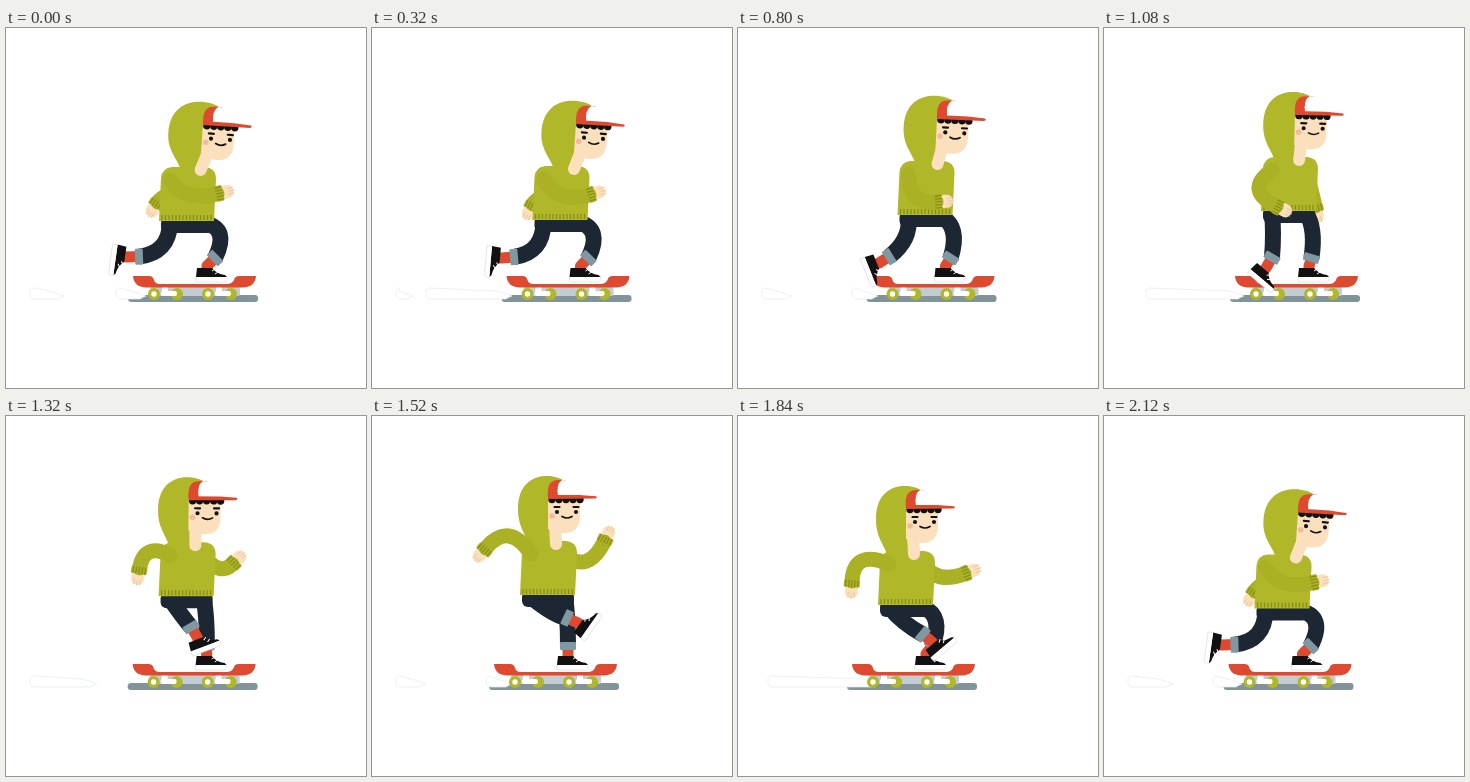
These frames come from a looping animation (360 by 360 pixels, 2160 ms). An HTML page with a canvas:

```html
<!DOCTYPE html>
<html lang="en">
<head>
<meta charset="utf-8">
<title>Skater</title>
<style>
  html, body { margin: 0; width: 100%; height: 100%; overflow: hidden; background: #fff; }
  canvas { display: block; width: 360px; height: 360px; }
</style>
</head>
<body>
<canvas id="stage" width="360" height="360"></canvas>
<script>
const g = document.getElementById('stage').getContext('2d');
const LOOP = 2160, STEP = 40, RAD = Math.PI / 180;
const GREEN = '#b0b729', DARK = '#858b16', SLEEVE = '#abb125', PANTS = '#1c2733', CUFF = '#7f98a2',
      RED = '#de4a30', SKIN = '#fbe0bd', BLACK = '#111', WHITE = '#fff';

// Key times, and the value of each moving part at those times
const KEYS = [0, 320, 800, 1080, 1520, 1840, 1970, 2120];
const TRACKS = {
  board:  [127, 134.5, 133.5, 131, 122, 114, 117, 124.5],
  hemY:   [193, 192, 187, 183, 179, 189, 193, 192.5],
  headX:  [197, 204, 199, 191, 176, 168, 179, 194],
  kneeX:  [224, 231, 222, 212, 196, 206, 212, 222],
  pushCX: [163, 171, 173, 170, 182, 165, 160, 161],
  pushCY: [225, 225, 212, 205, 200, 208, 222, 225],
  footX:  [121, 130, 141, 162, 206, 194, 160, 118.5],
  footY:  [229, 230, 235, 240, 207, 226, 240, 229],
  footA:  [98, 95, 68, 40, -55, -40, 20, 98],
  nearCX: [178, 186, 170, 140, 137, 116, 133, 175],
  nearCY: [174, 176, 176, 162, 105, 133, 170, 174],
  nearWX: [211, 217, 198, 172, 114, 114, 152, 208],
  nearWY: [166, 167, 174, 178, 132, 165, 180, 167],
  farCX:  [158, 165, 180, 208, 216, 200, 190, 157],
  farCY:  [165, 168, 170, 165, 158, 168, 172, 165],
  farWX:  [152, 161, 185, 211, 232, 226, 196, 151],
  farWY:  [174, 176, 172, 178, 126, 158, 182, 175]
};

// Looping monotone cubic interpolation
function sample(v, t) {
  const n = KEYS.length;
  const wrap = i => (i + n) % n;
  const span = i => (KEYS[wrap(i + 1)] - KEYS[wrap(i)] + LOOP) % LOOP;
  const slope = i => (v[wrap(i + 1)] - v[wrap(i)]) / span(i);
  const tangent = i => {
    const a = slope(i - 1), b = slope(i);
    return a * b > 0 ? 2 * a * b / (a + b) : 0;
  };
  let i = n - 1;
  while (KEYS[i] > t) i--;
  const d = span(i), u = (t - KEYS[i]) / d, w = 1 - u;
  return v[i] * w * w * (1 + 2 * u) + v[wrap(i + 1)] * u * u * (3 - 2 * u)
    + d * u * w * (tangent(i) * w - tangent(i + 1) * u);
}

function ramp(x, x0, x1, y0, y1) {
  const u = Math.min(1, Math.max(0, (x - x0) / (x1 - x0)));
  return y0 + (y1 - y0) * u;
}

function fill(color, d) { g.fillStyle = color; g.fill(new Path2D(d)); }
function line(color, width, d, cap = 'butt') {
  g.strokeStyle = color; g.lineWidth = width; g.lineCap = cap; g.lineJoin = 'round';
  g.stroke(new Path2D(d));
}
function dot(color, x, y, r) {
  g.fillStyle = color; g.beginPath(); g.arc(x, y, r, 0, 7); g.fill();
}
function pill(color, x, y, w, h, r) {
  g.fillStyle = color; g.beginPath(); g.roundRect(x, y, w, h, r); g.fill();
}
function local(x, y, angle, draw) {
  g.save(); g.translate(x, y); g.rotate(angle); draw(); g.restore();
}

function streak(x0, x1) {
  if (x1 - x0 < 3) return;
  const d = `M${x0 + 4} 260 Q${x0 - 1} 260 ${x0} 266 Q${x0} 271 ${x0 + 5} 271 H${x1 - 6}`
    + ` Q${x1 - 3} 269 ${x1} 268 Q${x1 - 10} 264 ${x1 - 15} 263 Z`;
  fill(WHITE, d);
  line('#e6ebeb', 0.7, d);
}

function wind(p) {
  streak(24, ramp(p, 0, 320, 58, 41) - ramp(p, 320, 360, 0, 17));
  const head = p < 80 ? 110 : ramp(p, 80, 320, 114, 54) - ramp(p, 320, 420, 0, 30);
  streak(head, ramp(p, 420, 720, 140, 58));
  if (p > 640) streak(ramp(p, 640, 720, 114, 104), 138);
}

function board(x) {
  local(x, 248, 0, () => {
    pill('#c3cdd1', 17, 11, 90, 9, 2);
    for (const w of [21, 75]) {
      dot(GREEN, w, 18, 6);
      dot(GREEN, w + 23, 18, 6);
      pill(WHITE, w + 7, 15, 16, 5, 2);
      pill(WHITE, w + 8, 11, 6, 7, 1);
      dot(WHITE, w, 18, 2.7);
    }
    fill(RED, 'M0 0H16Q20 0 21 4Q22 8 27 8H94Q99 8 101 4Q102 0 106 0H123Q122 11 110 11.5H13Q1 11 0 0Z');
  });
}

function shoe(x, y, angle) {
  local(x, y, angle, () => {
    fill(BLACK, 'M-10 2H5Q10 8 18 9L20 11H-11Z');
    fill(WHITE, 'M-11 11H20Q21 16 17 16H-11Z');
    line('#d5d8d8', 0.6, 'M-11 11V16H17Q21 16 20 11');
    line(WHITE, 1, 'M5 5L8 3M8 8L11 6');
  });
}

function leg(hx, hy, cx, cy, ex, ey, fx, fy, angle) {
  const dir = Math.atan2(fy - ey, fx - ex);
  line(RED, 11, `M${ex} ${ey}L${fx} ${fy}L${fx - Math.sin(angle) * 4} ${fy + Math.cos(angle) * 4}`);
  shoe(fx, fy, angle);
  line(PANTS, 16, `M${hx} ${hy}Q${cx} ${cy} ${ex} ${ey}`);
  local(ex, ey, dir, () => pill(CUFF, -4, -8, 8, 16, 1));
}

function arm(sx, sy, cx, cy, wx, wy) {
  const dir = Math.atan2(wy - cy, wx - cx);
  local(wx, wy, dir, () => {
    pill(SKIN, 0, -6.5, 17, 13, 6);
    line('#e5c49d', 0.8, 'M11 -3H17M12 0H18M11 3H17');
  });
  line(SLEEVE, 15, `M${sx} ${sy}Q${cx} ${cy} ${wx} ${wy}`, 'round');
  local(wx, wy, dir, () => {
    pill(SLEEVE, -1, -8, 7, 16, 1);
    for (let y = -6; y <= 6; y += 3) line(DARK, 1.1, `M-1 ${y}H6`);
  });
}

function torso(x, y) {
  fill(GREEN, `M${x} ${y}L${x + 2} ${y - 43}Q${x + 3} ${y - 53} ${x + 13} ${y - 54}`
    + `H${x + 46}Q${x + 57} ${y - 53} ${x + 57} ${y - 42}L${x + 55} ${y}Z`);
  for (let i = 3; i < 54; i += 3.5) line(DARK, 1.2, `M${x + i} ${y - 6}V${y - 1}`);
}

function head(x, y, tilt, neckX, neckY) {
  const left = -30 - tilt;
  local(x, y, tilt * RAD, () => fill(GREEN,
    `M15 -18C4 -25 ${left} -27 ${left} 11C${left} 32 -20 37 -16 56H2L6 0Z`));
  line(SKIN, 12, `M${x + 7 - tilt / 2} ${y + 28}L${neckX} ${neckY}`, 'round');
  local(x, y, tilt * RAD, () => {
    fill(SKIN, 'M0 0H32V18Q32 35 16 35Q8 35 0 31Z');
    dot('#f6b99c', 4, 18, 2.8);
    for (const e of [9, 28]) {
      dot(BLACK, e, 14, 2.1);
      line(BLACK, 2.2, `M${e - 2.5} 9H${e + 2.5}`, 'round');
    }
    line(BLACK, 1.7, 'M14 18.5Q19 21.5 24 18.5', 'round');
    for (let i = 4; i < 34; i += 7) dot(BLACK, i, 1.5, 3.7);
    fill(RED, 'M0 0Q-2 -18 10 -18H18V0Z');
    fill(WHITE, 'M10 -2Q8 -14 14 -18Q30 -18 31 -2Z');
    fill(RED, 'M0 -3H31L48 -1.8Q50 0 47 .6L0 1Z');
  });
}

function draw(t) {
  const p = {};
  for (const k in TRACKS) p[k] = sample(TRACKS[k], t);
  const x = p.board + 26, y = p.hemY, b = p.board;
  const tilt = (p.headX - x - 28) / 4;

  g.fillStyle = WHITE;
  g.fillRect(0, 0, 360, 360);
  pill('#82949a', b - 5, 267, 14, 7, 3.5);
  pill('#82949a', b + 4, 267, 121, 7, 3);
  wind(t % 720);
  board(b);

  arm(x + 45, y - 40, p.farCX, p.farCY, p.farWX, p.farWY);
  const ankleX = b + 74;
  leg(x + 45, y + 2, p.kneeX, 200, ankleX + (p.kneeX - ankleX) * 0.35, 230, ankleX, 238, 0);
  pill(PANTS, x + 2, y - 4, 52, 16, 6);
  const a = p.footA * RAD, shin = a + 80 * RAD;
  leg(x + 11, y + 2, p.pushCX, p.pushCY,
    p.footX - 12 * Math.cos(shin), p.footY - 12 * Math.sin(shin), p.footX, p.footY, a);

  torso(x, y);
  head(p.headX, y - 97, tilt, x + 36 + 1.4 * tilt, y - 51);
  arm(x + 11, y - 41, p.nearCX, p.nearCY, p.nearWX, p.nearWY);
}

const start = performance.now();
function tick() {
  const t = (performance.now() - start) % LOOP;
  draw(Math.floor(t / STEP) * STEP);
  requestAnimationFrame(tick);
}
tick();
</script>
</body>
</html>
```
